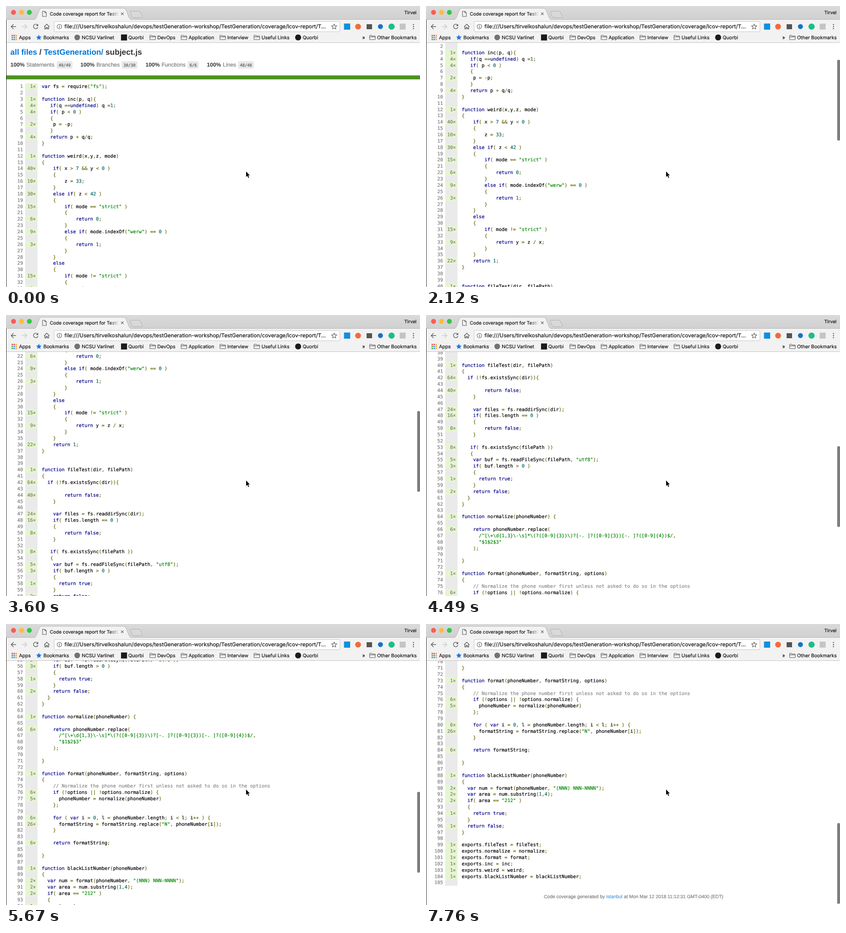
Animation of 907x617 px, one loop 8 s. Source, as an HTML page:

```html
<!DOCTYPE html>
<html lang="en">
<head>
<meta charset="utf-8">
<title>Code coverage report</title>
<style>
html, body { margin: 0; width: 100%; height: 100%; overflow: hidden; background: #fff; }
svg { display: block; width: 907px; height: 617px; }
/* a hairline in the text colour gives the heavier desktop rendering */
text, tspan { fill: var(--ink); stroke: var(--ink); stroke-width: .22px; }
text { white-space: pre; text-rendering: geometricPrecision; }
.ui { --ink: #161616; font-family: Inter, Roboto, sans-serif; font-size: 10.55px; }
.sans { --ink: #333; font-family: "Liberation Sans", Arial, sans-serif; font-size: 12.12px; }
.code { --ink: #000; font-family: "DejaVu Sans Mono", "Liberation Mono", monospace; font-size: 10.4px; }
.dim { --ink: #7b7b7b; }
.link { --ink: #0074d9; }
.pale { --ink: #4c9de4; }
.bold { font-weight: 700; stroke-width: 0; }
.bold tspan { stroke-width: 0; }
.end { text-anchor: end; }
.mid { text-anchor: middle; }
.com { --ink: #888; } .str { --ink: #080; } .kwd { --ink: #008; } .lit { --ink: #066; } .pun { --ink: #660; }
.icon { fill: none; stroke: #5c5c5c; stroke-width: 1.4; }
.thin { stroke-width: 1.1; }
</style>
</head>
<body>
<svg viewBox="0 0 907 617">
  <defs>
    <clipPath id="view"><rect x="0" y="81" width="907" height="536"/></clipPath>
    <linearGradient id="strip" x2="0" y2="1">
      <stop stop-color="#dadada"/><stop offset="1" stop-color="#d0d0d0"/>
    </linearGradient>
    <linearGradient id="fade" gradientUnits="userSpaceOnUse" x1="226" x2="247" y1="0" y2="0">
      <stop stop-color="#161616"/><stop offset="1" stop-color="#161616" stop-opacity="0"/>
    </linearGradient>
    <path id="folder" class="icon thin" d="M.6 9.4V1.6Q.6.6 1.6.6H4.6L6 2.1H12Q13 2.1 13 3.1V9.4Q13 10.2 12 10.2H1.6Q.6 10.2 .6 9.4ZM.6 4H13"/>
  </defs>

  <rect width="907" height="617" fill="#fff"/>
  <g clip-path="url(#view)">
    <g id="page">
      <text class="sans bold" x="9.5" y="107.3" style="font-size:17.32px"><tspan class="link">all files</tspan> / <tspan class="link">TestGeneration/</tspan> subject.js</text>
      <g id="stats"></g>
      <rect x="1" y="152.4" width="906" height="8.7" fill="#4d9221"/>
      <g id="rows"></g>
      <text class="sans dim mid" x="454.7" y="1652.6" style="font-size:10.39px">Code coverage generated by <tspan class="pale">istanbul</tspan> at Mon Mar 12 2018 11:12:31 GMT-0400 (EDT)</text>
    </g>
    <rect id="thumb" x="900.8" y="84" width="6.4" height="177.5" rx="3" fill="#7e7e7e" opacity="0"/>
  </g>

  <!-- tab strip -->
  <rect width="907" height="30" fill="url(#strip)"/>
  <rect y="29.5" width="907" height="51.5" fill="#f2f2f2"/>
  <path d="M0 29.5H62M275 29.5H907" stroke="#b4b4b4"/>
  <path d="M60 30C65 29.5 66 27 67.5 23L73 9Q74.5 5 78 5H258Q261.5 5 263 9L268.5 23C270 27 271 29.5 276 30" fill="#f2f2f2" stroke="#b0b0b0" stroke-width=".9"/>
  <path d="M274 11.5H291Q293.5 11.5 294.3 13.5L298.5 23.5Q299 25.3 297 25.3H280Q277.5 25.3 276.5 23L272.3 13.5Q271.6 11.5 274 11.5Z" fill="#d9d9d9" stroke="#adadad" stroke-width=".9"/>
  <circle cx="16.5" cy="14" r="5.4" fill="#fc5b57"/>
  <circle cx="34" cy="14" r="5.4" fill="#fdbb3d"/>
  <circle cx="51.2" cy="14" r="5.4" fill="#33c748"/>
  <path class="icon thin" d="M80 11.5H85L88.3 14.8V23H80ZM85 11.5V14.8H88.3"/>
  <text class="ui" x="96" y="20.8" style="font-size:10.2px;--ink:url(#fade)">Code coverage report for TestGe</text>
  <path class="icon thin" d="M252 14.3L257.6 19.9M257.6 14.3L252 19.9"/>
  <text class="ui end" x="899.3" y="18" style="font-size:10.1px">Tirvel</text>

  <!-- toolbar -->
  <path class="icon" d="M22 45.2H11.5M16.5 40L11.3 45.2L16.5 50.4"/>
  <path class="icon" style="stroke:#cacaca" d="M35 45.2H45.5M40.5 40L45.7 45.2L40.5 50.4"/>
  <path class="icon" d="M69.3 42A5 5 0 1 0 70 46.3"/>
  <path d="M70.5 39.3V44H65.8Z" fill="#5c5c5c"/>
  <path class="icon" d="M83.5 45.5L89.3 40L95.1 45.5M85.2 45V50.3H88V47H90.6V50.3H93.4V45"/>
  <rect x="105.5" y="34" width="626" height="22.5" rx="2.5" fill="#fff" stroke="#c6c6c6"/>
  <circle class="icon thin" cx="117" cy="45.2" r="5"/>
  <path class="icon" d="M117 44.5V48M117 42.2V43.5"/>
  <text class="ui" x="128" y="49.3" style="font-size:11.8px">file:///Users/tirvelkoshalun/devops/testGeneration-workshop/TestGeneration/coverage/lcov-report/T...</text>
  <path id="star" class="icon thin"/>
  <rect x="740.5" y="38.5" width="13.5" height="13.5" fill="#0f8fdf"/>
  <circle cx="771.3" cy="45.2" r="6.3" fill="#f26b3a"/>
  <rect x="790" y="40" width="12" height="11" fill="#555"/>
  <circle cx="820.3" cy="45.2" r="5.5" fill="#1673c8"/>
  <circle cx="844.7" cy="45.2" r="6.8" fill="#19bf87"/>
  <rect x="862.5" y="38.7" width="13" height="13" fill="#c4c4c4"/>
  <g fill="#5c5c5c"><circle cx="892.7" cy="40.7" r="1.3"/><circle cx="892.7" cy="45.2" r="1.3"/><circle cx="892.7" cy="49.7" r="1.3"/></g>

  <!-- bookmarks bar -->
  <g id="apps"></g>
  <path id="blueStar" fill="#1a73e8"/>
  <circle cx="156" cy="69" r="6.2" fill="#737373"/>
  <rect x="252" y="62.5" width="13.2" height="13.2" fill="#1b1b1b"/>
  <circle cx="640" cy="69" r="6.6" fill="#1b1b1b"/>
  <g id="marks"></g>
  <path d="M0 80.5H907" stroke="#c4c4c4"/>
  <path d="M.5 30V617" stroke="#2a2a2a"/>

  <path d="M526 363.2V375.2L528.7 372.7L530.8 377.5L532.6 376.7L530.5 372H534Z" fill="#000" stroke="#fff" paint-order="stroke"/>
</svg>

<script>
// Each line: hit count | code
const CODE = String.raw`1|var fs = require("fs");
|
1|function inc(p, q){
4|   if(q ==undefined) q =1;
4|   if( p < 0 )
|   {
2|    p = -p;
|   }
4|   return p + q/q;
|}
|
1|function weird(x,y,z, mode)
|{
40|    if( x > 7 && y < 0 )
|    {
10|        z = 33;
|    }
30|    else if( z < 42 )
|    {
15|        if( mode == "strict" )
|        {
6|            return 0;
|        }
9|        else if( mode.indexOf("werw") == 0 )
|        {
3|            return 1;
|        }
|    }
|    else
|    {
15|        if( mode != "strict" )
|        {
9|            return y = z / x;
|        }
|    }
22|    return 1;
|}
|
|
1|function fileTest(dir, filePath)
|{
64|  if (!fs.existsSync(dir)){
|
40|        return false;
|    }
|
24|    var files = fs.readdirSync(dir);
16|    if( files.length == 0 )
|    {
8|        return false;
|    }
|
8|   if( fs.existsSync(filePath ))
|   {
5|    var buf = fs.readFileSync(filePath, "utf8");
3|    if( buf.length > 0 )
|    {
1|      return true;
|    }
2|    return false;
|  }
|}
|
1|function normalize(phoneNumber) {
|
6|    return phoneNumber.replace(
|      /^[\+\d{1,3}\-\s]*\(?([0-9]{3})\)?[-. ]?([0-9]{3})[-. ]?([0-9]{4})$/,
|      "$1$2$3"
|    );
|
|}
|
1|function format(phoneNumber, formatString, options)
|{
|    // Normalize the phone number first unless not asked to do so in the options
6|    if (!options || !options.normalize) {
5|      phoneNumber = normalize(phoneNumber)
|    };
|
6|    for ( var i = 0, l = phoneNumber.length; i < l; i++ ) {
26|      formatString = formatString.replace("N", phoneNumber[i]);
|    }
|
6|    return formatString;
|
|}
|
1|function blackListNumber(phoneNumber)
|{
2|  var num = format(phoneNumber, "(NNN) NNN-NNNN");
2|  var area = num.substring(1,4);
2|  if( area == "212" )
|  {
1|    return true;
|  }
1|  return false;
|}
|
1|exports.fileTest = fileTest;
1|exports.normalize = normalize;
1|exports.format = format;
1|exports.inc = inc;
1|exports.weird = weird;
1|exports.blackListNumber = blackListNumber;
|`.split("\n");

const $ = id => document.getElementById(id);
function add(parent, tag, attrs, text) {
  const el = document.createElementNS("http://www.w3.org/2000/svg", tag);
  for (const k in attrs) el.setAttribute(k, attrs[k]);
  if (text !== undefined) el.textContent = text;
  return parent.appendChild(el);
}

// Code listing
const TOP = 169.6, PITCH = 13.863;
const TOKEN = /(\/\/.*)|("[^"]*"|\/\^.*\$\/)|(\b(?:var|function|return|if|else|for|true|false|undefined)\b)|(\b\d+\b)|([^\w\s])|\w+|\s+/g;
const KINDS = ["com", "str", "kwd", "lit", "pun"];
const rows = $("rows");
add(rows, "rect", { x: 42, y: TOP, width: 27, height: PITCH * CODE.length, fill: "#eaeaea" });
CODE.forEach((line, i) => {
  const cut = line.indexOf("|"), hits = line.slice(0, cut), code = line.slice(cut + 1);
  const y = TOP + i * PITCH, base = y + 10.6;
  add(rows, "text", { class: "code dim end", x: 37.2, y: base }, i + 1);
  if (hits) {
    add(rows, "rect", { x: 42, y, width: 27, height: PITCH, fill: "#e6f5d0" });
    add(rows, "text", { class: "code dim end", x: 65.3, y: base }, hits + "×");
  }
  const text = add(rows, "text", { class: "code", x: 78.2, y: base });
  for (const m of code.matchAll(TOKEN)) {
    const kind = m.slice(1).findIndex(Boolean);
    add(text, "tspan", kind < 0 ? {} : { class: KINDS[kind] }, m[0]);
  }
});

// Summary
[[9.7, "Statements", 111, "49/49"], [163, "Branches", 253.3, "30/30"],
 [305.8, "Functions", 398, "6/6"], [440, "Lines", 508.3, "48/48"]].forEach(([x, name, bx, ratio]) => {
  const w = ratio.length * 5.22 + 8.6, stats = $("stats");
  add(stats, "text", { class: "sans bold", x, y: 132.8 }, "100%");
  add(stats, "text", { class: "sans dim", x: x + 35, y: 132.8 }, name);
  add(stats, "rect", { x: bx, y: 121.2, width: w, height: 16.2, rx: 2.6, fill: "#e8e8e8" });
  add(stats, "text", { class: "code mid", x: bx + w / 2, y: 132.5, style: "font-size:8.66px;--ink:#555" }, ratio);
});

// Browser details
function star(cx, cy, r) {
  const pts = Array.from({ length: 10 }, (_, i) => {
    const a = i * Math.PI / 5, d = i % 2 ? r * 0.45 : r;
    return (cx + d * Math.sin(a)).toFixed(2) + " " + (cy - d * Math.cos(a)).toFixed(2);
  });
  return "M" + pts.join("L") + "Z";
}
$("star").setAttribute("d", star(719, 45.6, 6));
$("blueStar").setAttribute("d", star(72, 69.4, 6.4));
["#e8453c", "#e8453c", "#f0a030", "#35a853", "#4285f4", "#f0a030", "#35a853", "#4285f4", "#f0a030"].forEach((fill, i) =>
  add($("apps"), "rect", { x: 12.3 + i % 3 * 4.3, y: 63.4 + Math.floor(i / 3) * 4.3, width: 2.9, height: 2.9, fill }));
[[28.5, "Apps"], [82, "Bookmarks"], [166, "NCSU Varlinet"], [268, "Quorbi"], [331.5, "DevOps", 1],
 [400, "Application", 1], [485, "Interview", 1], [559.7, "Useful Links", 1], [650, "Quorbi"],
 [780.5, "»"], [813, "Other Bookmarks", 1]].forEach(([x, name, folder]) => {
  add($("marks"), "text", { class: "ui", x, y: 72.8 }, name);
  if (folder) add($("marks"), "use", { href: "#folder", x: x - 17, y: 63.6 });
});

// Scrolling: [time in ms, scroll offset in px]
const LOOP = 8000, END = 1050.5;
const STEPS = [
  [0, 0], [1350, 12], [1500, 62], [1670, 86],
  [2120, 102.1], [2270, 168], [2420, 214], [2560, 232],
  [2860, 248], [3010, 312], [3150, 348], [3300, 363],
  [3600, 377.6], [3750, 455], [3900, 487],
  [4200, 503], [4350, 580], [4490, 607.3],
  [4790, 624], [4940, 697], [5080, 727],
  [5380, 743], [5530, 816], [5670, 846.7],
  [5970, 905], [6120, 965],
  [6420, 982.8], [6570, 1033], [6720, END],
  [7020, END + 2], [7160, END], [7610, END + 5], [7760, END], [LOOP, END]
];
function play(el, frame) {
  el.animate(STEPS.map(([t, s]) => ({ offset: t / LOOP, easing: "step-end", ...frame(s) })),
    { duration: LOOP, iterations: Infinity });
}
play($("page"), s => ({ transform: `translateY(${-s}px)` }));
play($("thumb"), s => {
  const y = 83.7 + s * 0.3363;
  return { y: y + "px", height: Math.min(177.5, 615 - y) + "px", opacity: s ? 1 : 0 };
});
</script>
</body>
</html>
```
